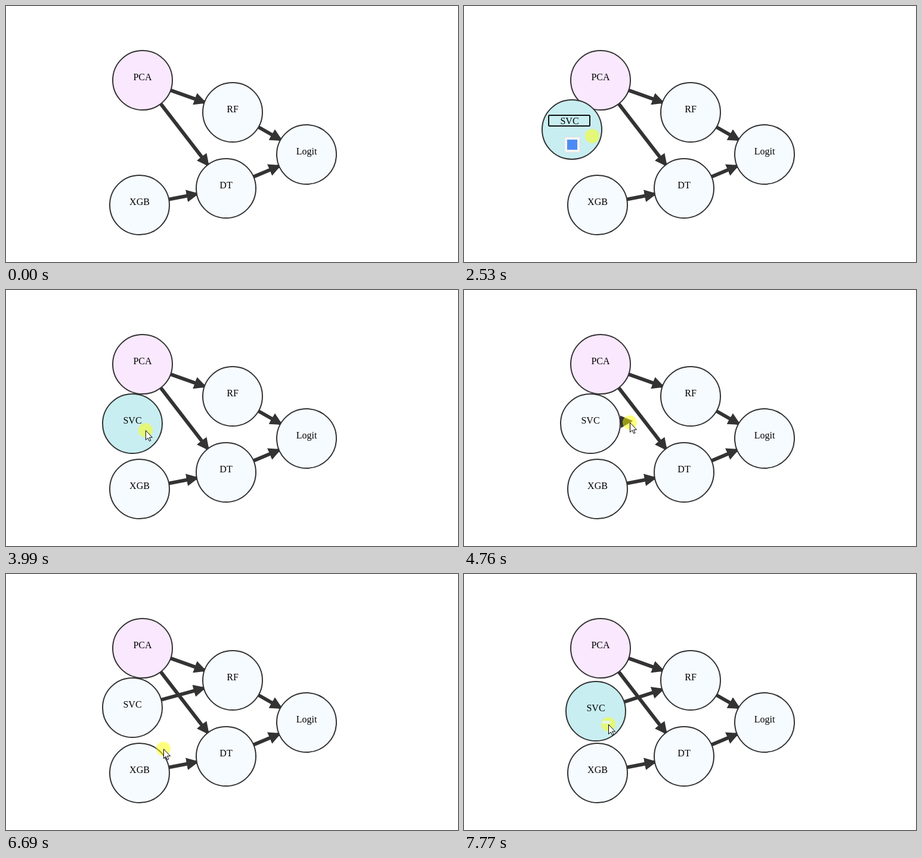
An HTML page that plays this animation: 758 by 431 pixels, repeating every 8 s.

```html
<!DOCTYPE html>
<html lang="en">
<head>
<meta charset="utf-8">
<title>Graph editor</title>
<style>
  html, body { margin: 0; width: 100%; height: 100%; overflow: hidden; background: #fff; }
  svg { display: block; width: 758px; height: 431px; background: #fff; }
  text { font: 16px "Liberation Serif", "Times New Roman", serif; text-anchor: middle; fill: #000; }
  .edge { stroke: #333; stroke-width: 6; fill: none; }
  .node { stroke: #333; stroke-width: 2; }
  #beam { mix-blend-mode: difference; }
</style>
</head>
<body>
<svg viewBox="0 0 758 431">
  <defs>
    <marker id="end" viewBox="0 -5 10 10" refX="32" markerWidth="3.5" markerHeight="3.5" orient="auto"><path d="M0,-5L10,0L0,5" fill="#333"/></marker>
    <marker id="drag" viewBox="0 -5 10 10" refX="7" markerWidth="3.5" markerHeight="3.5" orient="auto"><path d="M0,-5L10,0L0,5" fill="#333"/></marker>
  </defs>
  <g id="edges"></g>
  <g id="nodes"></g>
  <g id="editor">
    <rect id="field" x="142" y="184" width="69" rx="1.5" fill="none" stroke="#101010" stroke-width="2"/>
    <g id="selection">
      <path d="M163 185H198V202H203V220H152V202H163Z" fill="#3390ff"/>
      <text x="176.5" y="199" style="fill:#fff">new</text>
      <text x="177" y="217" style="fill:#fff">concept</text>
    </g>
    <text id="typed" x="177" y="199"></text>
    <g id="badge">
      <rect x="168.5" y="220.5" width="26" height="26" rx="3" fill="#f5f5f5" stroke="#dcdfe3"/>
      <rect x="173" y="225" width="17" height="17" fill="#4c8bf5"/>
    </g>
  </g>
  <path id="beam" d="M181 202.5H188M184.5 203V220M181 220.5H188" stroke="#fff" fill="none"/>
  <g id="pointer">
    <circle r="12" fill="#ff0" fill-opacity=".5"/>
    <rect id="glint" x="-11" y="-6" width="15" height="5" rx="2" fill="#e4f6e4"/>
    <path id="arrow" d="M.5 .5V16.5L4.2 13L6.6 18.5L9 17.5L6.6 12.2H11.5Z" fill="#fff" stroke="#000"/>
  </g>
</svg>
<script>
const LOOP = 8000;
const START = 428, STEP = 77.26; // the screen updates in even steps
const PLAIN = '#f6fbff', HOVER = '#c8eef1', SELECTED = '#fae8ff';
const $ = id => document.getElementById(id);

// Moments of the story, in steps
const CREATE = 9, BEAM = 10, BADGE = 11, HIDE = 16, TYPE = 18, RETURN = 25, ARROW = 29,
  COMMIT = 32, PULL = 51, DROP = 76, MOVE = 87, LAST = 95;

const home = [307, 401];
const move = (from, to, end, via = end) => ({ from, to, end, via });
const moves = [
  move(0, 7, [187, 205], [245, 300]),
  move(RETURN - 1, 28, [215, 219]),
  move(34, 43, [246, 236], [240, 257]),
  move(44, 48, [233, 236]),
  move(PULL - 1, 56, [278, 223], [264, 219]),
  move(56, 58, [284, 231]),
  move(61, 62, [280, 231]),
  move(63, 69, [392, 192], [330, 205]),
  move(77, 86, [233, 247], [270, 370]),
  move(MOVE, LAST, [242, 253], [234, 278])
];

const easeOut = u => 1 - (1 - u) ** 2;
const bezier = (a, b, c, u) =>
  a.map((v, i) => (1 - u) ** 2 * v + 2 * u * (1 - u) * b[i] + u * u * c[i]);

function pointerAt(step) {
  let p = home;
  for (const { from, to, end, via } of moves) {
    if (step <= from) break;
    p = bezier(p, via, end, easeOut(Math.min(1, (step - from) / (to - from))));
  }
  return p;
}

function make(tag, attrs, parent) {
  const el = document.createElementNS('http://www.w3.org/2000/svg', tag);
  set(el, attrs);
  return parent.appendChild(el);
}
function set(el, attrs) {
  for (const k in attrs) el.setAttribute(k, attrs[k]);
}
function show(el, on) {
  el.style.display = on ? '' : 'none';
}

const nodes = {
  PCA: [229, 125], RF: [380, 179], DT: [369, 307],
  XGB: [224, 335], Logit: [504, 250], SVC: [181, 208]
};
const views = {};
for (const name in nodes) {
  const g = make('g', {}, $('nodes'));
  const disc = make('circle', { r: 50, class: 'node' }, g);
  const label = make('text', {}, g);
  label.textContent = name;
  views[name] = { g, disc, label };
}

function addEdge(marker) {
  return make('path', { class: 'edge', 'marker-end': `url(#${marker})` }, $('edges'));
}
function connect(edge, from, to) {
  edge.setAttribute('d', `M${from}L${to}`);
}
for (const pair of ['PCA RF', 'PCA DT', 'XGB DT', 'RF Logit', 'DT Logit']) {
  const [a, b] = pair.split(' ');
  connect(addEdge('end'), nodes[a], nodes[b]);
}
const newEdge = addEdge('end'), dragEdge = addEdge('drag');

// The new node follows the pointer during its two drags
function newNodeAt(step) {
  const [x, y] = pointerAt(step < MOVE ? Math.max(COMMIT, Math.min(step, 43)) : step);
  return step < MOVE ? [x - 34, y - 11] : [x - 21, y - 22];
}

function hovered(step, [x, y]) {
  if (step < 0 || (step >= CREATE && step < RETURN)) return null;
  return Object.keys(nodes).reverse().find(name =>
    (name !== 'SVC' || step >= CREATE) &&
    Math.hypot(x - nodes[name][0], y - nodes[name][1]) < 51);
}

function draw(time) {
  const step = Math.floor((time - START) / STEP);
  const within = (a, b) => step >= a && step < b;
  const mouse = pointerAt(step);
  nodes.SVC = newNodeAt(step);

  const over = hovered(step, mouse);
  for (const name in nodes) {
    const [x, y] = nodes[name], { disc, label } = views[name];
    const fill = name === 'PCA' ? SELECTED : name === over ? HOVER : PLAIN;
    set(disc, { cx: x, cy: y, fill });
    set(label, { x, y });
  }
  show(views.SVC.g, step >= CREATE);
  show(views.SVC.label, step >= COMMIT);

  connect(newEdge, nodes.SVC, nodes.RF);
  show(newEdge, step >= DROP);
  connect(dragEdge, nodes.SVC, [mouse[0] - 1, mouse[1] - 2]);
  show(dragEdge, within(PULL, DROP));

  const typing = step >= TYPE;
  show($('editor'), within(CREATE, COMMIT));
  show($('selection'), !typing);
  show($('badge'), step >= BADGE);
  set($('field'), { height: typing ? 18 : 36 });
  $('typed').textContent = typing ? 'SVC'.slice(0, 1 + Math.floor((step - TYPE) / 2)) : '';

  show($('beam'), within(BEAM, HIDE));
  show($('pointer'), within(0, BEAM) || step >= RETURN);
  show($('arrow'), step < BEAM || step >= ARROW);
  show($('glint'), step >= LAST);
  set($('pointer'), { transform: `translate(${mouse})` });
}

function loop() {
  draw(performance.now() % LOOP);
  requestAnimationFrame(loop);
}
loop();
</script>
</body>
</html>
```
